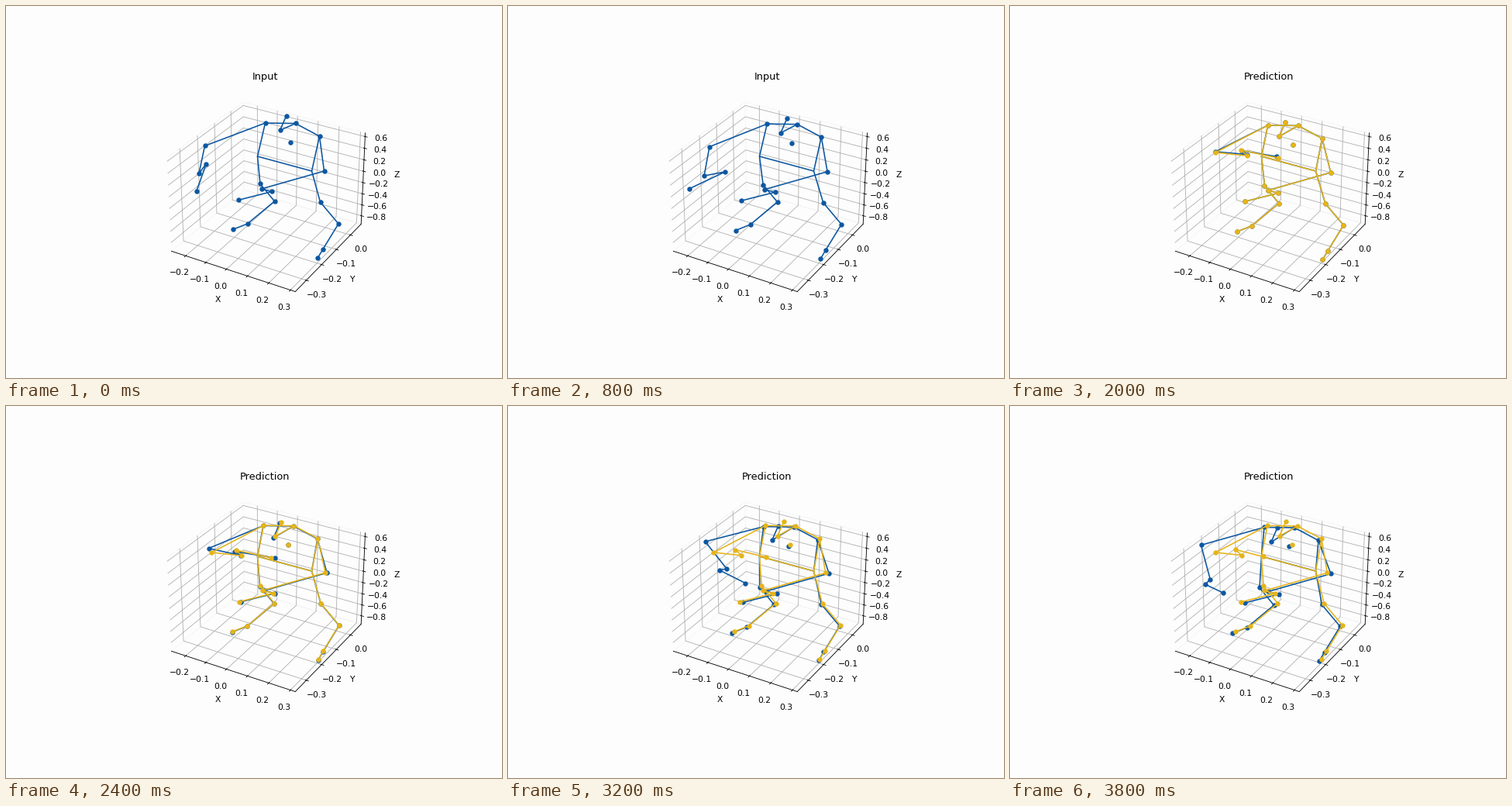
Recreate the animation shown at these times as a matplotlib script. Size 640 by 480 pixels, loop 4000 ms.

```python
import numpy as np
import matplotlib.pyplot as plt
from matplotlib.animation import FuncAnimation

W, H, DPI = 640, 480, 77
FRAMES, STEP = 20, 200
END, SWITCH = 3800, 2000
BACK, BLUE, GOLD = "#fdfdfd", "#0d57a1", "#e6b41a"

# Resting joints in stage pixels, grouped by the parts that move together
REST = {
    "head": dict(crown=(361.5, 142), face=(353.5, 160.5)),
    "trunk": dict(neck=(373.5, 151.5), r_sho=(404.5, 168),
                  l_sho=(334.5, 151), chest=(366.5, 176)),
    "l_leg": dict(l_hip=(328, 229.5), l_knee=(346.5, 252),
                  l_ank=(311.5, 281), l_toe=(292.5, 288.5)),
    "r_leg": dict(r_hip=(405.5, 253), r_knee=(429, 281),
                  r_ank=(408.5, 314.5), r_toe=(402, 325.5)),
    "r_arm": dict(r_elb=(410.5, 213), r_wri=(329.5, 236),
                  r_pal=(343, 239.5), r_tip=(299.5, 250.5)),
}
# Lean over the whole loop, sideways sway, and slide of the predicted copy
MOVES = {
    "head": ((-16.5, 15), 0, (0.5, -0.5)),
    "trunk": ((-6.5, 5.5), 0.7, (-0.7, 0.5)),
    "l_leg": ((-6, 5), 2.8, (-1.5, 0)),
    "r_leg": ((-3, 3.5), 2.5, (-1.5, 0)),
    "r_arm": ((3.5, 3.5), 2, (-4.5, 0.5)),
}
PELVIS = dict(l_pel=(324.5, 194), r_pel=(394.5, 213))
BONES = [chain.split() for chain in (
    "l_sho neck r_sho r_pel l_pel l_sho",
    "neck face crown",
    "l_sho l_elb l_wri l_pal l_tip",
    "r_sho r_elb r_wri r_pal r_tip",
    "l_pel l_hip l_knee l_ank l_toe",
    "r_pel r_hip r_knee r_ank r_toe",
)]


def ease(now, start, stop):
    s = np.clip((now - start) / (stop - start), 0, 1)
    return s * s * (3 - 2 * s)


def bump(now, mid, width):
    return np.exp(-((now - mid) / width) ** 2)


def polar(origin, angle, length):
    """Point at a distance from origin, with the angle measured from straight down."""
    a = np.radians(angle)
    return origin[0] + length * np.sin(a), origin[1] + length * np.cos(a)


def body(now, slide=0):
    u = now / END
    pts = {}
    for part, joints in REST.items():
        (dx, dy), sway, (gx, gy) = MOVES[part]
        for name, (x, y) in joints.items():
            pts[name] = (x + dx * u ** 1.5 + sway * np.sin(np.pi * u) + gx * slide,
                         y + dy * u + gy * slide)
    return pts


def left_arm(elbow, fore, tip, palm):
    wrist = polar(elbow, *fore)
    return dict(l_elb=elbow, l_wri=wrist, l_tip=polar(wrist, *tip), l_pal=polar(wrist, *palm))


def observed(now):
    keys = [0, 1400, 2000, 3200, END]
    elbow = (np.interp(now, keys, [256.5, 262.5, 265, 254.5, 246.5]),
             np.interp(now, keys, [180.5, 182.5, 188, 175, 179.5]))
    fore = -12 + 97 * ease(now, 700, 2000) - 72 * ease(now, 2000, 4000)
    tip = -8 - 41 * ease(now, 0, 400) + 135 * ease(now, 1000, 2000) - 42 * ease(now, 2700, 3400)
    palm = tip + 150 + 120 * ease(now, 2700, 3500)
    return body(now) | left_arm(
        elbow,
        (fore, 36 + 10 * now / END),
        (tip, 23 + 21 * bump(now, 2450, 750) + 6 * bump(now, 500, 300)),
        (palm, 15 + 14 * bump(now, 700, 350) - 6 * ease(now, 1400, 2000)))


def predicted(now):
    v = max(0, (now - SWITCH) / (END - SWITCH))
    return body(SWITCH, 1 - (1 - v) ** 2) | left_arm(
        (265.3, 189), (84, 41 - 7.5 * v), (86, 40 - 11.5 * v), (227, 10.5))


class Skeleton:
    def __init__(self, ax, color, pose, z):
        self.pose = pose
        self.lines = [ax.plot([], [], color=color, lw=1.5, zorder=z)[0] for _ in BONES]
        self.dots, = ax.plot([], [], "o", color=color, ms=6, mew=0, zorder=z + 1)

    def update(self, now, visible=True):
        pts = self.pose(now)
        self.dots.set_data(*zip(*pts.values()))
        pts |= PELVIS
        for line, chain in zip(self.lines, BONES):
            line.set_data(*zip(*(pts[name] for name in chain)))
        for artist in (*self.lines, self.dots):
            artist.set_visible(visible)


# The tiny surplus keeps the canvas from rounding down to 639 pixels
fig = plt.figure(figsize=((W + 1e-6) / DPI, (H + 1e-6) / DPI), dpi=DPI, facecolor=BACK)

side = 284.6
box = fig.add_axes([191.9 / W, 93.5 / H, side / W, side / H], projection="3d")
box.set_facecolor("none")
box.view_init(elev=30, azim=-60)
box.set(xlabel="X", ylabel="Y", zlabel="Z",
        xticks=np.arange(-2, 4) / 10,
        yticks=np.arange(-3, 1) / 10,
        zticks=np.arange(-4, 4) / 5)
box.set_xlim(-0.2718, 0.3218)
box.set_ylim(-0.3696, 0.0778)
box.set_zlim(-0.9526, 0.6604)
for axis in (box.xaxis, box.yaxis, box.zaxis):
    axis.pane.set_fill(False)
    axis.pane.set_edgecolor("#f0f0f0")

stage = fig.add_axes([0, 0, 1, 1])
stage.set(xlim=(0, W), ylim=(H, 0))
stage.axis("off")

truth = Skeleton(stage, BLUE, observed, 2)
guess = Skeleton(stage, GOLD, predicted, 4)


def draw(frame):
    now = frame * STEP
    predicting = now >= SWITCH
    box.set_title("Prediction" if predicting else "Input")
    truth.update(now)
    guess.update(now, predicting)


anim = FuncAnimation(fig, draw, frames=FRAMES, interval=STEP, init_func=lambda: draw(0),
                     repeat=True, repeat_delay=0, blit=False)
plt.show()
```
